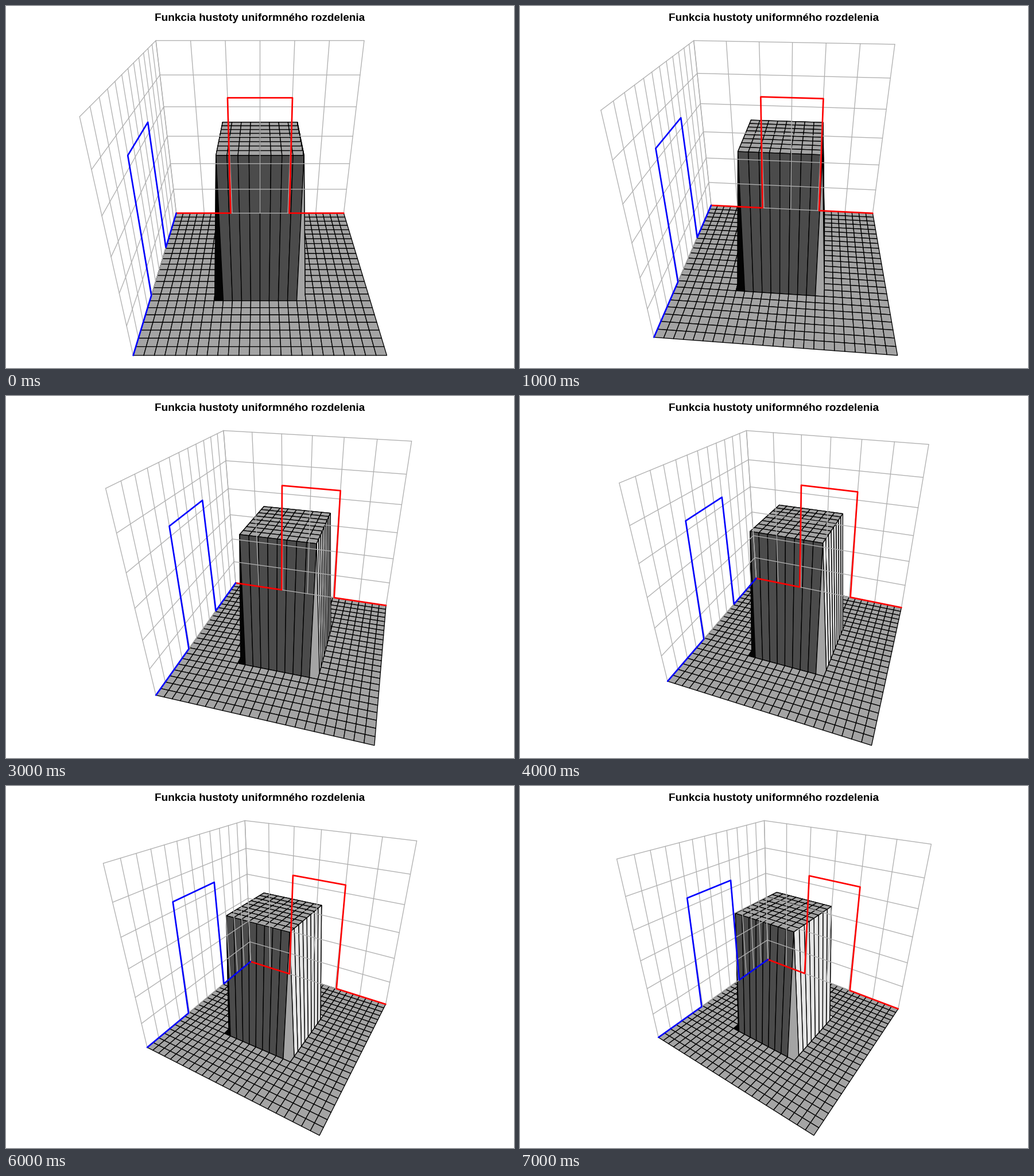
A matplotlib script that plays this animation: 885 by 632 pixels, repeating every 8000 ms.

```python
import numpy as np
import matplotlib
import matplotlib.pyplot as plt
from matplotlib.animation import FuncAnimation
from matplotlib.collections import LineCollection, PolyCollection

matplotlib.rcParams["path.snap"] = False

W, H, DPI = 885, 632, 64
PX = 72 / DPI                      # points per pixel
TOP, BOTTOM = 60.4, 610.0          # vertical extent of the projected cube
PHI = np.radians(30)
EYE = np.sqrt(3) + 2               # distance of the eye from the centre
CELLS = 24
PEAK = 0.43                        # plateau height in cube units
SHADE = 0.64
STEP_IN, STEP_OUT = 1 / 3, 0.35    # edges of the marginal densities


def project(points, theta):
    """Perspective projection of points in the cube [-1, 1]^3."""
    x, y, z = np.moveaxis(np.asarray(points, float), -1, 0)
    c, s = np.cos(theta), np.sin(theta)
    across, near = x * c + y * s, x * s - y * c
    depth = EYE - z * np.sin(PHI) - near * np.cos(PHI)
    up = z * np.cos(PHI) - near * np.sin(PHI)
    return np.stack([across / depth, up / depth], axis=-1)


CUBE = np.array([(x, y, z) for x in (-1, 1) for y in (-1, 1) for z in (-1, 1)])


def to_screen(theta):
    """Return a function mapping cube points to pixels, fitted to the stage."""
    corners = project(CUBE, theta)
    low, high = corners.min(axis=0), corners.max(axis=0)
    scale = (BOTTOM - TOP) / (high[1] - low[1])
    mid = (low[0] + high[0]) / 2

    def screen(points):
        p = project(points, theta)
        return np.stack([W / 2 + (p[..., 0] - mid) * scale,
                         TOP + (high[1] - p[..., 1]) * scale], axis=-1)
    return screen


def make_surface():
    """Quads of the density surface and their grey levels."""
    idx = np.arange(CELLS + 1) - CELLS // 2
    ix, iy = np.meshgrid(idx, idx, indexing="ij")
    inside = (abs(ix) <= 4) & (abs(iy) <= 4)
    pts = np.stack([ix / 12, iy / 12, np.where(inside, PEAK, -1)], axis=-1)
    a, b, c, d = pts[:-1, :-1], pts[1:, :-1], pts[1:, 1:], pts[:-1, 1:]
    quads = np.stack([a, b, c, d], axis=2).reshape(-1, 4, 3)
    normal = np.cross(quads[:, 1] - quads[:, 3], quads[:, 2] - quads[:, 0])
    normal /= np.linalg.norm(normal, axis=1, keepdims=True)
    light = normal @ np.array([1, 1, 0]) / np.sqrt(2)
    grey = np.clip((1 + light) / 2, 0, 1) ** SHADE
    return quads, np.repeat(grey[:, None], 3, axis=1)


def make_walls():
    """Grid lines on the back wall (y = 1) and the left wall (x = -1)."""
    lines = []
    for t in np.linspace(-1, 1, 7):
        lines.append([(t, 1, -1), (t, 1, 1)])
        lines.append([(-1, 1, t), (1, 1, t)])
        lines.append([(-1, -1, t), (-1, 1, t)])
    for t in np.linspace(-1, 1, 13):
        lines.append([(-1, t, -1), (-1, t, 1)])
    return np.array(lines)


QUADS, GREYS = make_surface()
WALLS = make_walls()
PROFILE = [(-1, -1), (-STEP_OUT, -1), (-STEP_IN, PEAK),
           (STEP_IN, PEAK), (STEP_OUT, -1), (1, -1)]
RED = np.array([(t, 1, z) for t, z in PROFILE])
BLUE = np.array([(-1, t, z) for t, z in PROFILE])

fig = plt.figure(figsize=(W / DPI, H / DPI), dpi=DPI, facecolor="white")
ax = fig.add_axes([0, 0, 1, 1])
ax.set_xlim(0, W)
ax.set_ylim(H, 0)
ax.axis("off")

thin, thick = 1.333 * PX, 2.667 * PX
surface = PolyCollection([], edgecolors="black", linewidths=thin,
                         joinstyle="round", zorder=1)
walls = LineCollection([], colors="#b0b0b0", linewidths=thin,
                       capstyle="round", zorder=2)
ax.add_collection(surface, autolim=False)
ax.add_collection(walls, autolim=False)


def curve(color, z):
    line, = ax.plot([], [], color=color, lw=thick, zorder=z,
                    solid_capstyle="round", solid_joinstyle="round")
    return line


red, blue = curve("#ff0000", 3), curve("#0000ff", 4)
ax.text(W / 2, 26.2, "Funkcia hustoty uniformného rozdelenia",
        family="Liberation Sans", weight="bold", size=19 * PX,
        ha="center", va="baseline", color="black")


def draw(frame):
    theta = np.radians(5 * frame)
    screen = to_screen(theta)
    centre = QUADS.mean(axis=1)
    near = centre[:, 0] * np.sin(theta) - centre[:, 1] * np.cos(theta)
    order = np.argsort(near, kind="stable")
    surface.set_verts(screen(QUADS[order]))
    surface.set_facecolor(GREYS[order])
    walls.set_segments(screen(WALLS))
    red.set_data(*screen(RED).T)
    blue.set_data(*screen(BLUE).T)
    return surface, walls, red, blue


anim = FuncAnimation(fig, draw, frames=8, interval=1000,
                     repeat=True, repeat_delay=0, blit=False)
plt.show()
```
